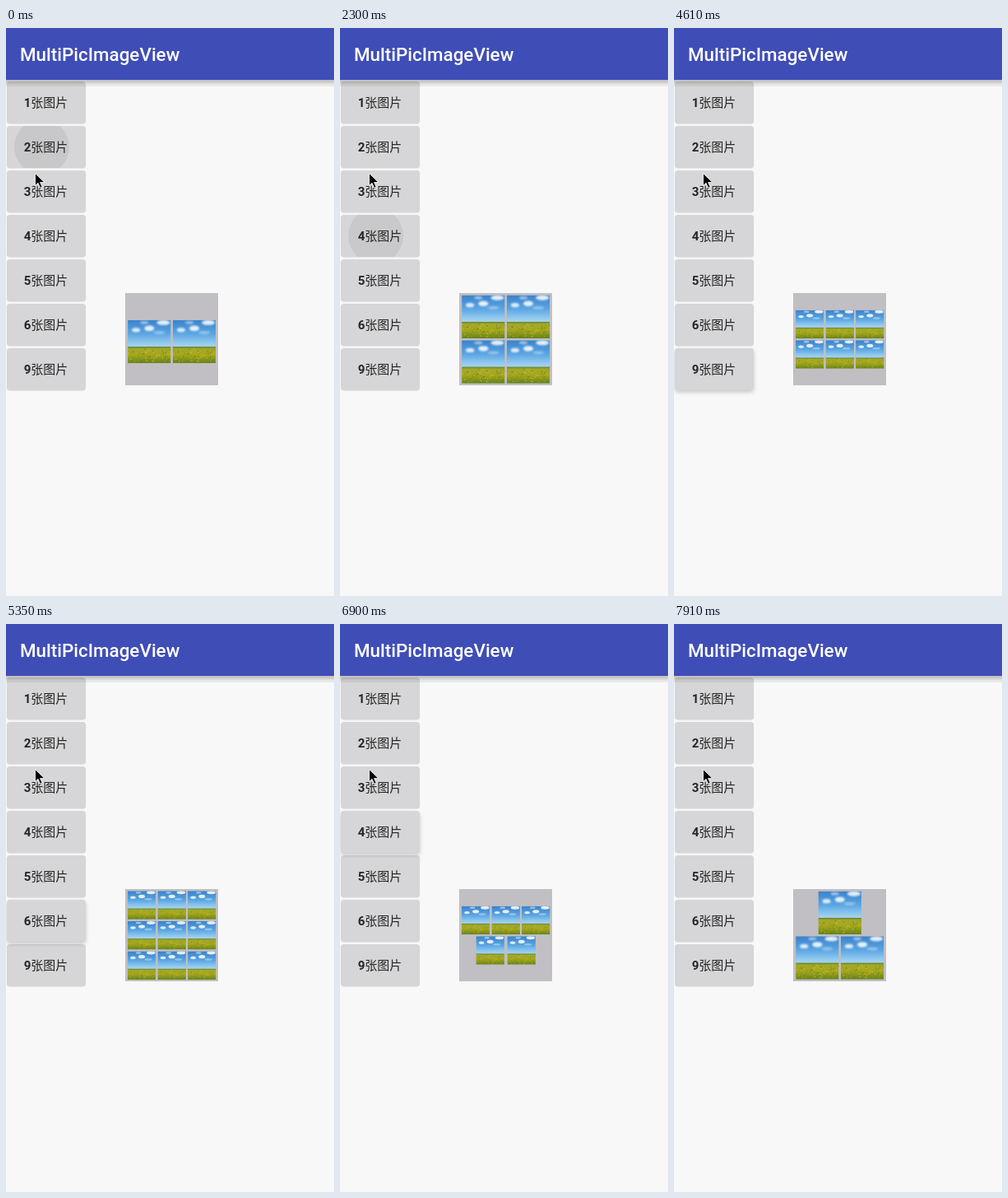
Recreate the animation shown at these times as an HTML page. Size 399 by 690 pixels, loop 8 s.

```html
<!DOCTYPE html>
<html lang="zh">
<head>
<meta charset="utf-8">
<title>MultiPicImageView</title>
<style>
html, body { margin: 0; width: 100%; height: 100%; overflow: hidden; background: #f8f8f8; }
#stage { position: relative; width: 399px; height: 690px; overflow: hidden; background: #f8f8f8; }
header {
  position: absolute; z-index: 5; left: 0; top: 0; width: 399px; height: 63px;
  background: #3f4db6; color: #fff; font: 500 22.4px/65px Roboto, sans-serif;
  text-indent: 17px; white-space: nowrap;
}
header::after {
  content: ""; position: absolute; left: 0; top: 63px; width: 100%; height: 8px;
  background: linear-gradient(rgba(0,0,0,.24), rgba(0,0,0,.14) 4px, rgba(0,0,0,.08) 5px, rgba(0,0,0,.05));
}
.button {
  position: absolute; left: .5px; width: 96px; height: 51px; border-radius: 4px;
  background: #d6d6d8; color: #252525; text-align: center;
  font: 400 15px/51px "Noto Sans CJK SC", "Noto Sans CJK", sans-serif;
}
.button b { font-family: Roboto, sans-serif; font-weight: 700; }
.clip { position: absolute; inset: 0; overflow: hidden; border-radius: 4px; }
.ripple { position: absolute; border-radius: 50%; background: #000; }
.label { position: absolute; inset: -1px 0 0; white-space: nowrap; }
svg { position: absolute; left: 0; top: 0; z-index: 6; }
</style>
</head>
<body>
<div id="stage">
  <header>MultiPicImageView</header>
  <svg width="399" height="690" viewBox="0 0 399 690">
    <defs>
      <linearGradient id="sky" x2="0" y2="1">
        <stop offset="0" stop-color="#3a82cc"/>
        <stop offset=".5" stop-color="#5aa5e2"/>
        <stop offset=".8" stop-color="#8cc6ee"/>
        <stop offset="1" stop-color="#b0d6e8"/>
      </linearGradient>
      <linearGradient id="field" x2="0" y2="1">
        <stop offset="0" stop-color="#5d8238"/>
        <stop offset=".14" stop-color="#a3a92a"/>
        <stop offset=".5" stop-color="#a8a61c"/>
        <stop offset="1" stop-color="#62821c"/>
      </linearGradient>
      <filter id="soft"><feGaussianBlur stdDeviation="1.1"/></filter>
      <symbol id="photo" viewBox="0 0 52 52">
        <rect width="52" height="33" fill="url(#sky)"/>
        <g fill="#fff" filter="url(#soft)">
          <ellipse cx="10" cy="12" rx="5" ry="2.6" opacity=".8"/>
          <ellipse cx="26" cy="10" rx="6" ry="3.2" opacity=".85"/>
          <ellipse cx="20" cy="3" rx="5" ry="1.8" opacity=".5"/>
          <ellipse cx="43" cy="3" rx="8" ry="3" opacity=".85"/>
          <ellipse cx="38" cy="15" rx="7" ry="2" opacity=".35"/>
        </g>
        <rect y="32" width="52" height="20" fill="url(#field)"/>
        <g id="flowers"></g>
      </symbol>
    </defs>
    <rect x="145" y="322" width="113" height="112" fill="#c1bfc3"/>
    <g id="photos"></g>
    <path d="M35.5 176.5V191.5l3.5-3.2 2.5 5.7 2.5-1.1-2.5-5.4h5.2z" fill="#000" stroke="#fff" stroke-width=".8"/>
  </svg>
</div>
<script>
const LOOP = 8000;
const COUNTS = [1, 2, 3, 4, 5, 6, 9];
// [click time, number of pictures chosen]
const CLICKS = [[-110, 2], [1080, 3], [2020, 4], [2970, 5], [3910, 6],
                [4640, 9], [5430, 6], [6210, 5], [7000, 4], [7540, 3]];
const ROWS = { 1: [1], 2: [2], 3: [1, 2], 4: [2, 2], 5: [3, 2], 6: [3, 3], 9: [3, 3, 3] };
const stage = document.getElementById('stage');
const photos = document.getElementById('photos');
const clamp = v => Math.min(1, Math.max(0, v));

const buttons = COUNTS.map((count, i) => {
  const el = document.createElement('div');
  el.className = 'button';
  el.style.top = 65 + 54 * i + 'px';
  el.innerHTML = `<div class="clip"><div class="ripple"></div></div><div class="label"><b>${count}</b>张图片</div>`;
  stage.append(el);
  return { count, el, ripple: el.querySelector('.ripple') };
});

let seed = 7;
const random = () => (seed = seed * 16807 % 2147483647) / 2147483647;
const FLOWER_COLORS = ['#d0c01c', '#5c831d', '#879a22'];
document.getElementById('flowers').innerHTML = Array.from({ length: 110 }, (_, i) =>
  `<circle cx="${random() * 52}" cy="${35 + random() * 16}" r="${.4 + random() * .4}" fill="${FLOWER_COLORS[i % 3]}"/>`).join('');

function layout(count) {
  const rows = ROWS[count];
  const small = count > 4;
  const size = small ? 34.5 : 52.5;
  const pitch = small ? 36.6 : 54.7;
  const top = 378.2 - ((rows.length - 1) * pitch + size) / 2 + (rows.length === 1 ? 2.8 : 0);
  return rows.flatMap((n, row) => Array.from({ length: n }, (_, col) => {
    const gap = small && n === 2 ? 38 : pitch;
    const x = 201.7 - ((n - 1) * gap + size) / 2 + col * gap;
    return `<use href="#photo" x="${x}" y="${top + row * pitch}" width="${size}" height="${size}"/>`;
  })).join('');
}

let shown = 0;
function showPhotos(count) {
  if (count === shown) return;
  shown = count;
  photos.innerHTML = layout(count);
}

function drawButton({ count, el, ripple }, t) {
  let lift = 0, radius = 0, alpha = 0;
  for (const [at, chosen] of CLICKS) {
    const age = t - at;
    if (chosen !== count || age < -250 || age > 370) continue;
    lift = clamp((age + 250) / 80) * clamp(1 - age / 50);
    radius = 33.5 * (1 - (1 - clamp(age / 110)) ** 2);
    alpha = .065 * clamp((370 - age) / 90);
  }
  el.style.zIndex = lift > 0 ? 2 : 1;
  el.style.boxShadow = `0 ${.6 + 2 * lift}px ${1 + 4 * lift}px rgba(0,0,0,${.15 + .05 * lift})`;
  Object.assign(ripple.style, {
    left: 43 - radius + 'px', top: 25.5 - radius + 'px',
    width: 2 * radius + 'px', height: 2 * radius + 'px', opacity: alpha
  });
}

function render(t) {
  showPhotos(CLICKS.filter(([at]) => at <= t).pop()[1]);
  buttons.forEach(button => drawButton(button, t));
}

const start = performance.now();
function tick() {
  render((performance.now() - start) % LOOP);
  requestAnimationFrame(tick);
}
tick();
</script>
</body>
</html>
```
